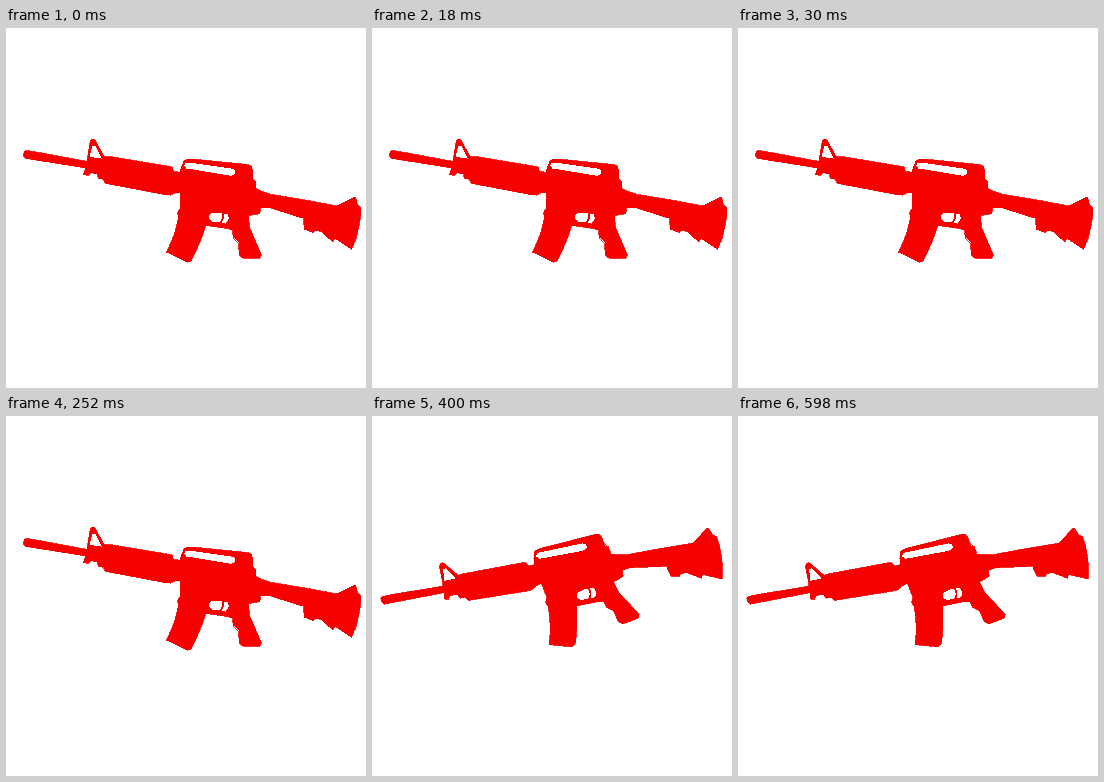
Animation of 360 by 360 pixels, one loop 0.73 s. Source, as an HTML page:

```html
<!DOCTYPE html>
<html lang="en">
<head>
<meta charset="utf-8">
<title>Rocking silhouette</title>
<style>
html, body { margin: 0; width: 100%; height: 100%; overflow: hidden; background: #fff; }
svg { display: block; width: 100vw; height: 100vh; }
#shape { fill: #f60000; stroke: #f60000; stroke-width: .8; }
.hole { fill: #fff; stroke: none; }
.trigger { fill: none; stroke-width: 1.8; }
</style>
</head>
<body>
<svg viewBox="0 0 360 360" shape-rendering="crispEdges">
  <g id="shape">
    <!-- barrel, sight and handguard -->
    <path d="M19 122 L29 123.500 80 133 81 129 83.500 113 Q86 109 89 112 L98 128 102 128 163 138 166 139 167 143 174 144
      174 164 169 164 163 166.500 157 166 99 155 97 151 92 150 91 146 84 144 81 147 77 146 79 139.500 19 130
      Q17 129 17 126 Q17 122 19 122 Z"/>
    <!-- body, magazine and grip -->
    <path d="M173 144 L175 138 177 133 Q179 130 184 130.500 L240 136 Q245 136 246 140 L246 149 249 153 249 160 255 163
      254 179 253 185 242 187 243 198 255 226 253 229.500 236 229.500 233 226 232 214 227 209 226 202 220 200 199 197
      Q193 217 185 232 Q183 234 180 233.500 L160 224 Q169 207 172 188 L171 183 174 179 Z"/>
    <!-- stock -->
    <path d="M254 162.500 L264 166 295 171 330 177.500 346 169 Q349 167 350 171 L351 176 354 179 354 187
      Q352 206 345 221 L328 210 326 213.500 314 203 308 202 306 204 298 201 297 190 290 188 262 179 253 179 Z"/>
    <path class="hole" d="M86 117 L83 128.500 95 130 89 117 Z"/>
    <path class="hole" d="M178 137 Q178 134 182 134 L225 140 Q229 141 229 144 Q228 148 222 147 L180 140 Z"/>
    <path class="hole" d="M204 185 L213 184 221 186 Q224 191 219 195 L205 193 Q200 189 204 185 Z"/>
    <path class="trigger" d="M216 184 Q218 191 213 195"/>
  </g>
</svg>
<script>
const shape = document.getElementById("shape");
const LOOP = 730, TURN = 400;
const level = "translate(.5 .5)";
const tilted = "translate(9.3 185) rotate(-19.85) translate(-17 -126)";

function draw(now) {
  shape.setAttribute("transform", now % LOOP < TURN ? level : tilted);
  requestAnimationFrame(draw);
}
draw(performance.now());
</script>
</body>
</html>
```
